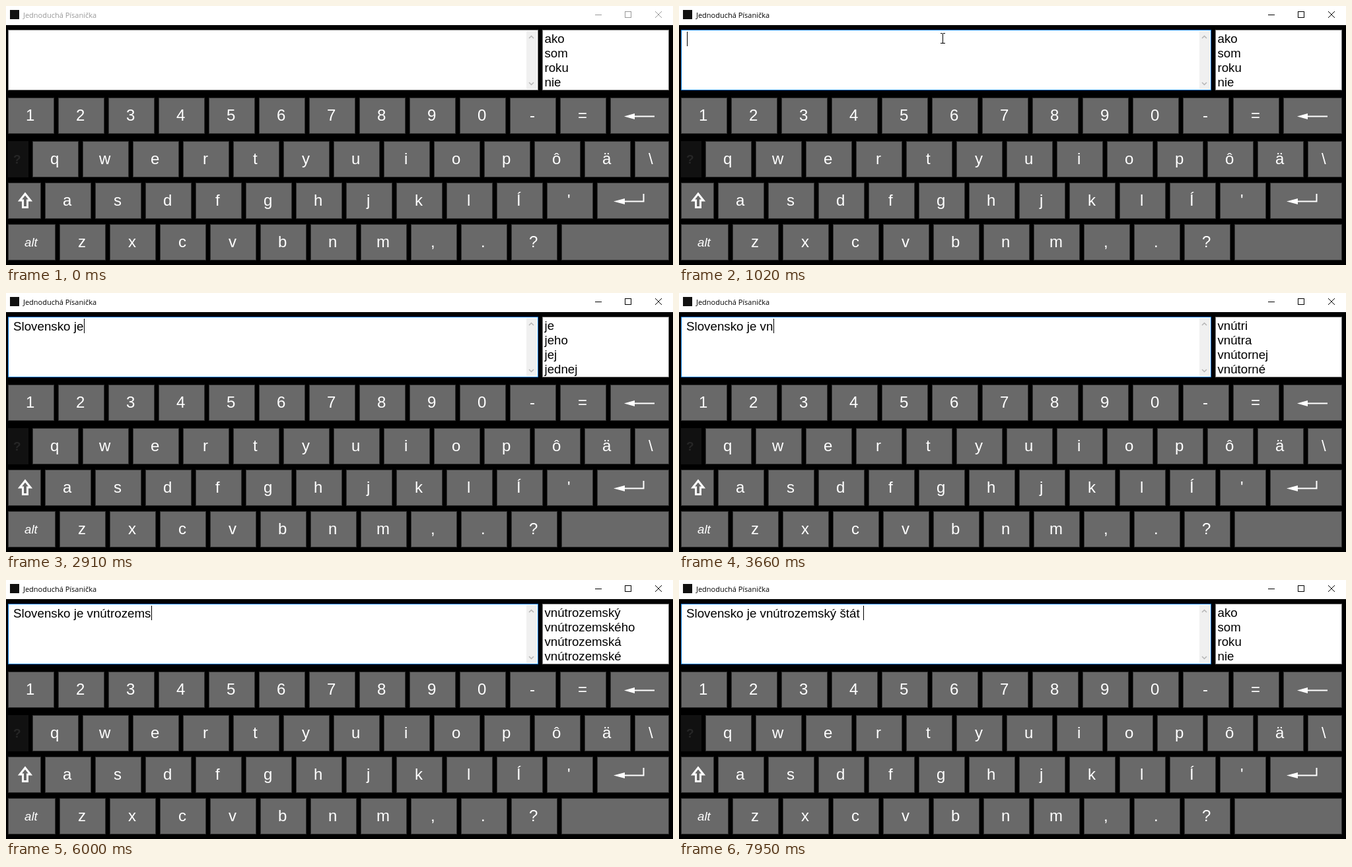
Write an HTML page with a canvas that moves like this. It is 1010 px wide and 393 px high and loops after 8 s.

```html
<!DOCTYPE html>
<html lang="sk">
<head>
<meta charset="utf-8">
<title>Jednoduchá Písanička</title>
<style>
html, body { margin: 0; width: 100%; height: 100%; overflow: hidden; background: #000; }
canvas { display: block; }
</style>
</head>
<body>
<canvas id="stage" width="1010" height="393"></canvas>
<script>
const ctx = document.getElementById('stage').getContext('2d');
const LOOP = 8000, FOCUS = 760, BLINK = 530;
const SANS = '"Liberation Sans", Arial, sans-serif';

// Words offered for the current prefix
const COMMON = 'ako som roku nie';
const COUNTRY = 'Slovensku Slovenska Slovensko Slovenskej';
const INNER = 'vnútri vnútra vnútornej vnútorné';
const INLAND = 'vnútrozemia vnútrozemí vnútrozemský vnútrozemie';
const INLAND_ADJ = 'vnútrozemský vnútrozemského vnútrozemská vnútrozemské';
const STATE = 'štátu štáty štátnej štátov';

// [time, appended text, suggestions]
const KEYSTROKES = [
  [1080, 'S', COUNTRY], [1350, 'l', COUNTRY], [1450, 'o', COUNTRY], [1550, 'v', COUNTRY],
  [1640, 'en', COUNTRY], [1740, 's', COUNTRY], [1820, 'k', COUNTRY],
  [2040, 'o', 'Slovensko Slovenskom Slovenskou'], [2370, ' ', COMMON],
  [2580, 'j', 'je jeho jej jednej'], [2790, 'e', 'je jeho jej jednej'], [3060, ' ', COMMON],
  [3530, 'v', 'v vo však veľmi'], [3650, 'n', INNER],
  [4000, 'ú', INNER], [4260, 't', INNER],
  [4670, 'r', 'vnútri vnútra vnútrozemia vnútro'],
  [5160, 'o', INLAND], [5300, 'z', INLAND], [5450, 'e', INLAND], [5600, 'm', INLAND],
  [5940, 's', INLAND_ADJ], [6080, 'k', INLAND_ADJ],
  [6240, 'ý', 'vnútrozemský vnútrozemských vnútrozemským'], [6390, ' ', COMMON],
  [7190, 'š', STATE], [7400, 't', STATE], [7620, 'á', STATE], [7780, 't', STATE],
  [7940, ' ', COMMON]
];

const keys = [];
const addKey = (x, y, w, label = '') => keys.push({ x, y, w, h: 55, label });
const addRow = (x, y, labels) => [...labels].forEach((c, i) => addKey(x + 76 * i, y, 70, c));
addRow(3, 139, '1234567890-=');
addKey(915, 139, 89);
addRow(40, 205, 'qwertyuiopôä');
addKey(952, 205, 52, '\\');
addKey(3, 268, 50);
addRow(59, 268, "asdfghjklÍ'");
addKey(895, 268, 109);
addKey(3, 331, 72);
addRow(81, 331, 'zxcvbnm,.?');
addKey(841, 331, 163);

function box(x, y, w, h, fill, border) {
  ctx.fillStyle = fill;
  ctx.fillRect(x, y, w, h);
  if (!border) return;
  ctx.strokeStyle = border;
  ctx.lineWidth = 1;
  ctx.strokeRect(x + .5, y + .5, w - 1, h - 1);
}

function write(s, x, y, font, fill) {
  ctx.font = font;
  ctx.fillStyle = fill;
  ctx.fillText(s, x, y);
}

// Centred on cx, snapped to a whole pixel
function writeCentred(s, cx, y, font, fill) {
  ctx.font = font;
  write(s, Math.floor(cx - ctx.measureText(s).width / 2), y, font, fill);
}

function trace(points, close) {
  ctx.beginPath();
  points.forEach(([x, y]) => ctx.lineTo(x, y));
  if (close) ctx.closePath();
}

function line(points, color, width, close) {
  trace(points, close);
  ctx.strokeStyle = color;
  ctx.lineWidth = width;
  ctx.stroke();
}

function shape(points, color) {
  trace(points, true);
  ctx.fillStyle = color;
  ctx.fill();
}

function titleBar(active) {
  const ink = active ? '#000' : '#999';
  box(0, 0, 1010, 29, '#fff');
  box(6, 6, 14, 14, '#111');
  write('Jednoduchá Písanička', 26, 18, '11px "Open Sans", "Noto Sans", sans-serif', ink);
  line([[892, 13.5], [902, 13.5]], ink, 1);
  ctx.strokeRect(937.5, 8.5, 9, 9);
  line([[983, 8], [993, 18]], ink, 1);
  line([[993, 8], [983, 18]], ink, 1);
}

function fields(text, words, focused, caret) {
  box(3, 36, 803, 92, '#fff', focused ? '#0078d7' : '#7a7a7a');
  box(788, 38, 16, 88, '#f0f0f0');
  line([[792, 49], [795.5, 45.5], [799, 49]], '#b5b5b5', 1.5);
  line([[792, 116], [795.5, 119.5], [799, 116]], '#b5b5b5', 1.5);
  write(text, 11, 57, '18.75px ' + SANS, '#000');
  if (caret) box(Math.round(11.5 + ctx.measureText(text).width), 39, 1, 22, '#000');

  box(812, 36, 192, 92, '#fff', '#7a7a7a');
  words.split(' ').forEach((w, i) => write(w, 815.5, 56 + 22 * i, '18.67px ' + SANS, '#000'));
}

function keyboard(mouse) {
  for (const k of keys) {
    const over = mouse && mouse.x >= k.x && mouse.x < k.x + k.w && mouse.y >= k.y && mouse.y < k.y + k.h;
    box(k.x, k.y, k.w, k.h, over ? '#7c7c7c' : '#696969', '#303030');
    writeCentred(k.label, k.x + k.w / 2 - .8, k.y + 35, '24px ' + SANS, '#fff');
  }
  box(3, 205, 31, 55, '#111');
  writeCentred('?', 17, 239, 'bold 19px ' + SANS, '#262626');
  writeCentred('alt', 38, 365, 'italic 18.67px ' + SANS, '#fff');

  shape([[936, 167.5], [952, 163], [952, 172]], '#fff');
  line([[951, 167.5], [982, 167.5]], '#fff', 2);
  shape([[920, 296.5], [937, 292], [937, 301]], '#fff');
  line([[936, 296.5], [965.5, 296.5], [965.5, 285]], '#fff', 2);
  line([[29, 285], [37, 295], [32.5, 295], [32.5, 305.5], [25.5, 305.5], [25.5, 295], [21, 295]],
    '#fff', 3, true);
}

// Pointer enters over the space bar and glides up to the text field
function pointer(t) {
  if (t < 180 || t >= 2580) return null;
  if (t >= 1140) return { x: 398, y: 49 };
  const p = Math.min(1, (t - 180) / 540), e = p * p * (3 - 2 * p), r = 1 - e;
  return {
    x: r * r * 870 + 2 * r * e * 580 + e * e * 399,
    y: r * r * 384 + 2 * r * e * 208 + e * e * 49
  };
}

function drawPointer({ x, y }) {
  x = Math.round(x);
  y = Math.round(y);
  if (y < 128) {
    box(x, y - 7, 1, 15, '#000');
    for (const dy of [-8, 7]) {
      box(x - 3, y + dy, 3, 1, '#000');
      box(x + 1, y + dy, 3, 1, '#000');
    }
    return;
  }
  const arrow = [[0, 0], [0, 16], [4, 12.5], [6.5, 18], [9, 17], [6.5, 11.5], [11.5, 11.5]]
    .map(([dx, dy]) => [x + dx, y + dy]);
  shape(arrow, '#fff');
  line(arrow, '#000', 1, true);
}

function draw(t) {
  let text = '', words = COMMON, edited = 930;
  for (const [at, added, offer] of KEYSTROKES) {
    if (t < at) break;
    text += added;
    words = offer;
    edited = at;
  }
  const focused = t >= FOCUS;
  const caret = t >= edited && (t - edited) % (2 * BLINK) < BLINK;
  const mouse = pointer(t);
  box(0, 0, 1010, 393, '#000');
  titleBar(focused);
  fields(text, words, focused, caret);
  keyboard(mouse);
  if (mouse) drawPointer(mouse);
}

ctx.fontKerning = 'none';
const start = performance.now();
function tick() {
  draw((performance.now() - start) % LOOP);
  requestAnimationFrame(tick);
}
tick();
</script>
</body>
</html>
```
